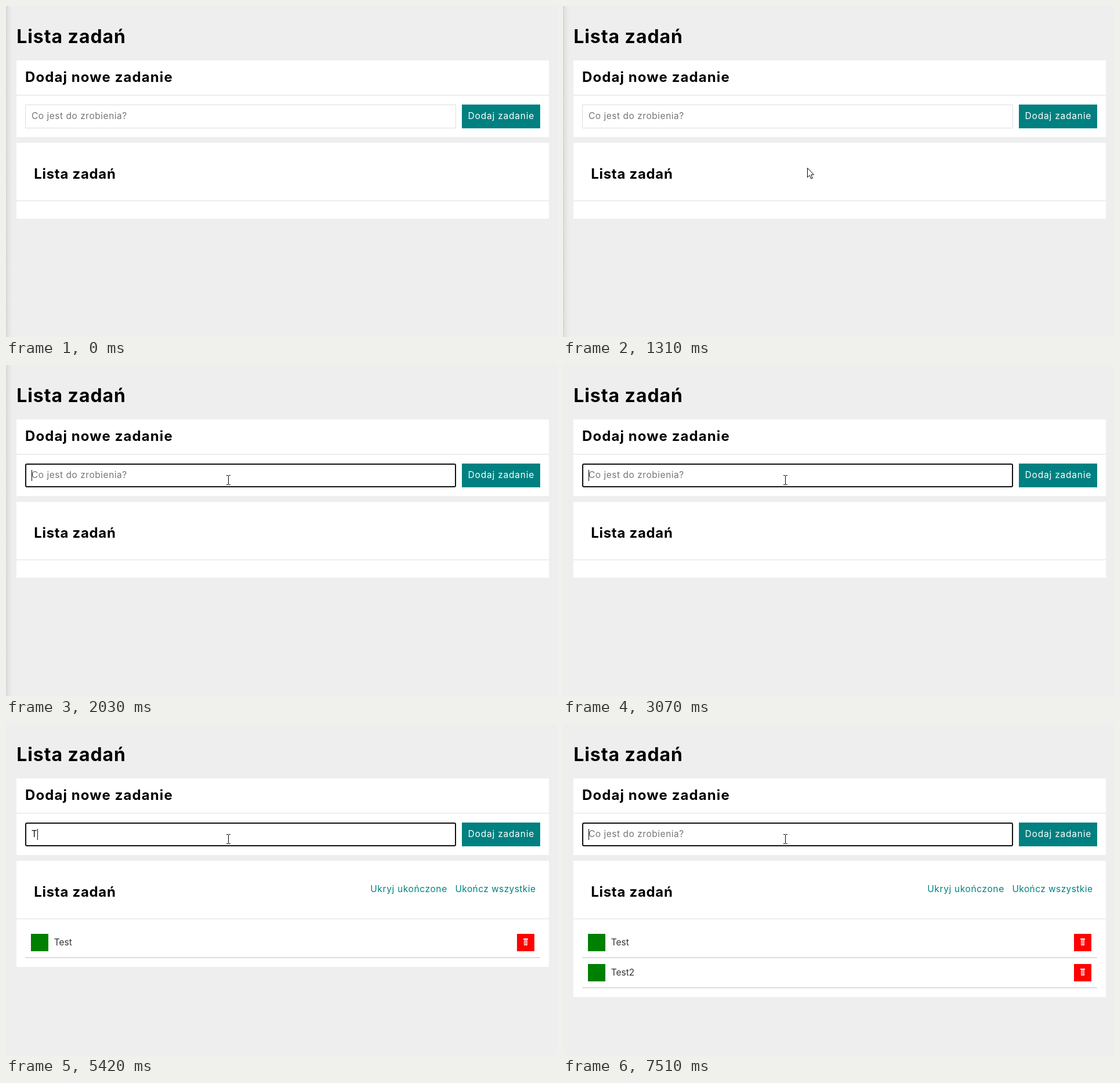
Write an HTML page with a canvas that moves like this. It is 950 px wide and 571 px high and loops after 8 s.

```html
<!DOCTYPE html>
<html lang="pl">
<head>
<meta charset="utf-8">
<title>Lista zadań</title>
<style>
  html, body { margin: 0; width: 100%; height: 100%; overflow: hidden; background: #eee; }
  canvas { display: block; }
</style>
</head>
<body>
<canvas id="stage" width="950" height="571"></canvas>
<script>
const ctx = document.getElementById('stage').getContext('2d');
const LOOP = 8000;
const FOCUS = 2030;
const BLINK = 520;
const KEY_STEP = 170;
const DIGIT_PAUSE = 370;
const TEAL = '#008080';
const FONT = 'Inter, "Open Sans", sans-serif';

const MOVE = { start: 620, length: 1450, from: [823, 566], bend: [480, 460], to: [383, 198] };
const TASKS = [
  { name: 'Test', start: 3120, added: 4180 },
  { name: 'Test2', start: 5420, added: 7300 }
];

// A digit takes longer to reach than a letter
for (const task of TASKS) {
  task.keys = [...task.name].map((ch, i) =>
    task.start + i * KEY_STEP + (/\d/.test(ch) ? DIGIT_PAUSE : 0));
}
const BLINK_STARTS = [FOCUS, TASKS[0].added, ...TASKS.flatMap(task => task.keys)];

function box(x, y, w, h, color) {
  ctx.fillStyle = color;
  ctx.fillRect(x, y, w, h);
}

function text(str, x, y, size, weight, color, spacing) {
  ctx.font = `${weight} ${size}px ${FONT}`;
  ctx.letterSpacing = spacing + 'px';
  ctx.fillStyle = color;
  ctx.fillText(str, x, y);
}

const heading = (str, x, y, size, spacing) => text(str, x, y, size, 700, '#000', spacing);
const label = (str, x, y, color, spacing = 0) => text(str, x, y, 15.5, 400, color, spacing);

function drawShadow(t) {
  const alpha = Math.max(0, Math.min(1, (2160 - t) / (2160 - FOCUS)));
  const g = ctx.createLinearGradient(0, 0, 11, 0);
  g.addColorStop(0, `rgba(0,0,0,${0.1 * alpha})`);
  g.addColorStop(0.4, `rgba(0,0,0,${0.04 * alpha})`);
  g.addColorStop(1, 'rgba(0,0,0,0)');
  box(0, 0, 11, 571, g);
}

function typedAt(t) {
  const task = TASKS.find(({ start, added }) => t >= start && t < added);
  return task ? task.name.slice(0, task.keys.filter(k => t >= k).length) : '';
}

function caretOn(t) {
  const since = t - Math.max(...BLINK_STARTS.filter(s => t >= s));
  return Math.floor(since / BLINK) % 2 === 0;
}

function drawField(t) {
  const focused = t >= FOCUS;
  ctx.strokeStyle = focused ? '#101010' : '#ddd';
  ctx.lineWidth = focused ? 2 : 1;
  ctx.beginPath();
  if (focused) ctx.roundRect(34, 171, 741, 39, 2);
  else ctx.rect(33.5, 170.5, 742, 40);
  ctx.stroke();

  const typed = typedAt(t);
  if (typed) label(typed, 43.7, 195, '#111');
  else label('Co jest do zrobienia?', 43.9, 195, '#757575', 0.53);
  if (focused && caretOn(t)) {
    box(44 + Math.floor(ctx.measureText(typed).width), 181, 1, 19, '#000');
  }
}

function drawBin(x, y) {
  box(x, y, 8, 2, '#fff');
  box(x + 1, y + 2.5, 6, 9.5, 'rgba(255,255,255,.8)');
  for (let i = 0; i < 3; i++) box(x + 2 + i * 1.7, y + 3.5, 0.6, 7, '#f22');
}

function drawTask({ name }, i) {
  const y = 362 + i * 52;
  box(43, y, 30, 30, '#008000');
  label(name, 82.7, y + 20, '#333');
  box(881, y, 30, 30, '#f00');
  drawBin(892, y + 8);
  box(33, y + 40, 888, 2, '#ddd');
}

function drawList(t) {
  const shown = TASKS.filter(task => t >= task.added);
  box(18, 236, 918, 131 + shown.length * 52, '#fff');
  box(18, 335, 918, 2, '#eee');
  heading('Lista zadań', 48.2, 298, 24, 0.7);
  if (!shown.length) return;
  label('Ukryj ukończone', 628.2, 290, TEAL, 0.63);
  label('Ukończ wszystkie', 774.4, 290, TEAL, 0.41);
  shown.forEach(drawTask);
}

// Slowing move along a quadratic curve
function pointerAt(t) {
  const s = Math.min(1, (t - MOVE.start) / MOVE.length);
  const v = Math.pow(1 - s, 2.8);
  const u = 1 - v;
  return MOVE.from.map((a, i) =>
    Math.round(v * v * a + 2 * u * v * MOVE.bend[i] + u * u * MOVE.to[i]));
}

function drawArrow(x, y) {
  ctx.save();
  ctx.translate(x + 0.5, y + 0.5);
  ctx.fillStyle = '#fff';
  ctx.strokeStyle = '#000';
  ctx.lineWidth = 1;
  const shape = new Path2D('M0 0V16L3.7 12.7 6.3 18.5 8.7 17.5 6.2 11.5H11Z');
  ctx.fill(shape);
  ctx.stroke(shape);
  ctx.restore();
}

function drawBeam(x, y) {
  box(x, y - 7, 1, 15, '#000');
  for (const edge of [y - 8, y + 8]) {
    box(x - 3, edge, 3, 1, '#000');
    box(x + 1, edge, 3, 1, '#000');
  }
}

function drawPointer(t) {
  if (t < MOVE.start) return;
  const [x, y] = pointerAt(t);
  if (y < 211) drawBeam(x, y);
  else drawArrow(x, y);
}

function draw(t) {
  box(0, 0, 950, 571, '#eee');
  drawShadow(t);
  heading('Lista zadań', 18.2, 64, 32, 0.95);
  box(18, 94, 918, 132, '#fff');
  box(18, 153, 918, 2, '#eee');
  heading('Dodaj nowe zadanie', 33, 131, 24, 1.09);
  drawField(t);
  box(786, 170, 135, 41, TEAL);
  label('Dodaj zadanie', 796.6, 195, '#fff', 0.8);
  drawList(t);
  drawPointer(t);
}

const start = performance.now();
function tick(now) {
  draw(Math.max(0, now - start) % LOOP);
  requestAnimationFrame(tick);
}
draw(0);
requestAnimationFrame(tick);
</script>
</body>
</html>
```
